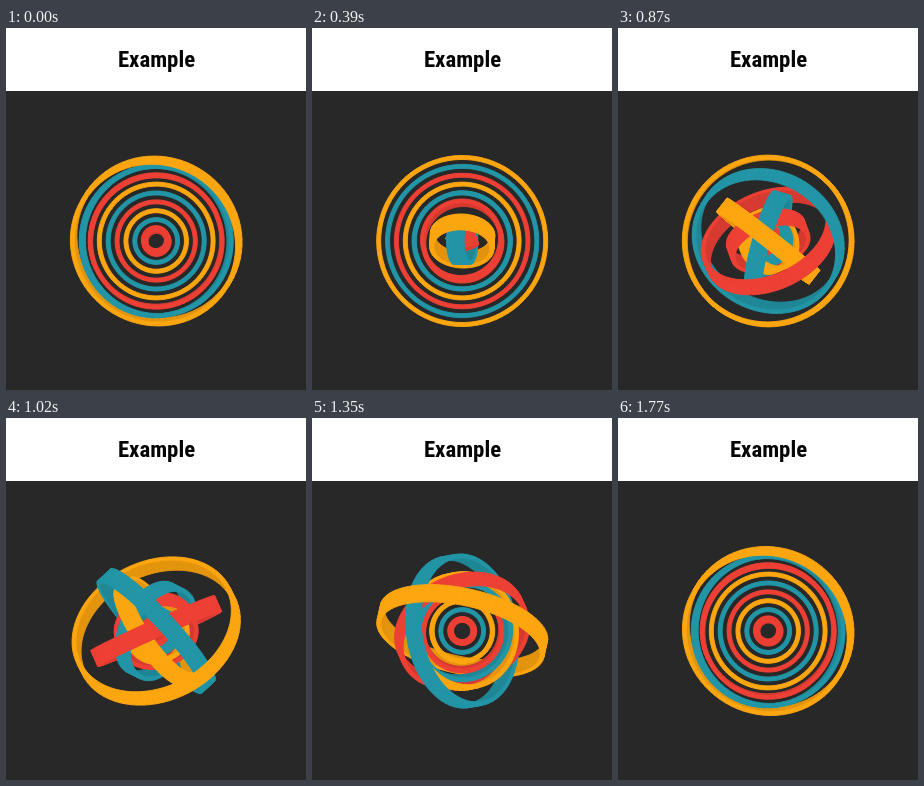
These frames come from a looping animation (300x362 px, 1800 ms). An HTML page with a canvas:

```html
<!DOCTYPE html>
<html lang="en">
<head>
<meta charset="utf-8">
<title>Example</title>
<style>
  html, body { margin: 0; width: 100%; height: 100%; overflow: hidden; background: #282828; }
  h1 {
    position: absolute; left: 0; top: 0; width: 301px; height: 63px; margin: 0;
    background: #fff; color: #050505; text-align: center;
    font: bold 22.8px/63px "Roboto Condensed", Roboto, "Liberation Sans Narrow", sans-serif;
    font-stretch: 75%;
  }
  canvas { position: absolute; left: 0; top: 63px; width: 300px; height: 299px; }
</style>
</head>
<body>
<h1>Example</h1>
<canvas id="stage"></canvas>
<script>
const LOOP = 1800, STEP = 30, DELAY = 120, START = -150;
const CX = 150.2, CY = 150, HALF = 8.6, SEGS = 80;
const RED = [238, 64, 53], TEAL = [34, 150, 167], YELLOW = [253, 166, 16];

// Rings from the inside out: axis angle, its drift per ms, side, head start
const rings = [
  [-20, 0, 1, 0], [94, .07, 1, -60], [20, .14, -1, 0],
  [-20, 0, 1, 0], [98, .07, -1, 0], [38, .12, -1, 0],
  [-24, 0, 1, 0], [50, .1, -1, 60], [-9, .12, 1, 60]
].map(([axis, drift, side, lead], k) => ({
  axis, drift, side, lead, k,
  outer: 14.5 + k * 8.88,
  inner: k ? 10.5 + k * 8.88 : 8.6,
  color: [RED, TEAL, YELLOW][k % 3]
}));

// Tilt in degrees against the local time of a ring
const tiltKeys = [
  [-150, 0], [-90, 1], [0, 7], [30, 13], [150, 51], [270, 88], [390, 98], [450, 114],
  [570, 130], [630, 138], [750, 152], [900, 163], [1020, 172], [1170, 180]
];

const canvas = document.getElementById("stage");
const ctx = canvas.getContext("2d");
const dpr = window.devicePixelRatio || 1;
canvas.width = 300 * dpr;
canvas.height = 299 * dpr;
ctx.scale(dpr, dpr);
ctx.lineJoin = "round";
ctx.lineWidth = .9;

const rad = d => d * Math.PI / 180;
const rgb = (c, f) => `rgb(${c.map(v => Math.round(v * f)).join()})`;

function slope(i) {
  if (i === 0 || i === tiltKeys.length - 1) return 0;
  const a = tiltKeys[i - 1], b = tiltKeys[i + 1];
  return (b[1] - a[1]) / (b[0] - a[0]);
}

function tiltAt(p) {
  const last = tiltKeys.length - 1;
  if (p >= tiltKeys[last][0]) return 180;
  let i = 0;
  while (p >= tiltKeys[i + 1][0]) i++;
  const [x0, y0] = tiltKeys[i], [x1, y1] = tiltKeys[i + 1];
  const d = x1 - x0, u = (p - x0) / d, v = 1 - u;
  return y0 * (1 + 2 * u) * v * v + slope(i) * d * u * v * v
       + y1 * u * u * (3 - 2 * u) - slope(i + 1) * d * u * u * v;
}

// Visible faces of one ring, sorted from far to near
function facesOf(ring, t) {
  const shifted = t - DELAY * ring.k + ring.lead - START;
  const p = (shifted % LOOP + LOOP) % LOOP + START;
  const tilt = rad(tiltAt(p));
  const axis = rad(ring.axis + ring.drift * (Math.min(p, 600) - 270));
  const ca = Math.cos(axis), sa = Math.sin(axis);
  const ct = Math.cos(tilt), st = Math.sin(tilt) * ring.side;
  const normal = [st * sa, -st * ca, ct];
  const cap = ct >= 0 ? HALF : -HALF;

  const point = (angle, r, h) => {
    const x = r * Math.cos(angle), y = r * Math.sin(angle);
    return [
      x * ca - y * sa * ct + h * normal[0],
      x * sa + y * ca * ct + h * normal[1],
      y * st + h * normal[2]
    ];
  };
  const faces = [];
  const add = (a, b, r1, h1, r2, h2, shade) => {
    const pts = [point(a, r1, h1), point(b, r1, h1), point(b, r2, h2), point(a, r2, h2)];
    const z = pts.reduce((sum, q) => sum + q[2], 0) / 4;
    faces.push({ pts, z, fill: rgb(ring.color, shade) });
  };

  for (let i = 0; i < SEGS; i++) {
    const a = i / SEGS * 2 * Math.PI, b = (i + 1) / SEGS * 2 * Math.PI;
    const facing = Math.sin((a + b) / 2) * st;
    if (facing > .001) add(a, b, ring.outer, -HALF, ring.outer, HALF, 1);
    if (facing < -.001) add(a, b, ring.inner, -HALF, ring.inner, HALF, .9);
    if (Math.abs(ct) > .001) add(a, b, ring.inner, cap, ring.outer, cap, 1);
  }
  return faces.sort((f, g) => f.z - g.z);
}

function paint({ pts, fill }) {
  ctx.fillStyle = ctx.strokeStyle = fill;
  ctx.beginPath();
  for (const [x, y] of pts) ctx.lineTo(CX + x, CY + y);
  ctx.closePath();
  ctx.fill();
  ctx.stroke();
}

function draw(t) {
  ctx.fillStyle = "#282828";
  ctx.fillRect(0, 0, 300, 299);
  const shells = rings.map(ring => facesOf(ring, t));
  // Far halves go from the outside in, near halves from the inside out
  for (const faces of [...shells].reverse()) faces.filter(f => f.z < 0).forEach(paint);
  for (const faces of shells) faces.filter(f => f.z >= 0).forEach(paint);
}

const begin = performance.now();
let shown = -1;
function tick() {
  const now = Math.max(0, performance.now() - begin) % LOOP;
  const t = Math.floor(now / STEP) * STEP;
  if (t !== shown) draw(shown = t);
  requestAnimationFrame(tick);
}
tick();
</script>
</body>
</html>
```
